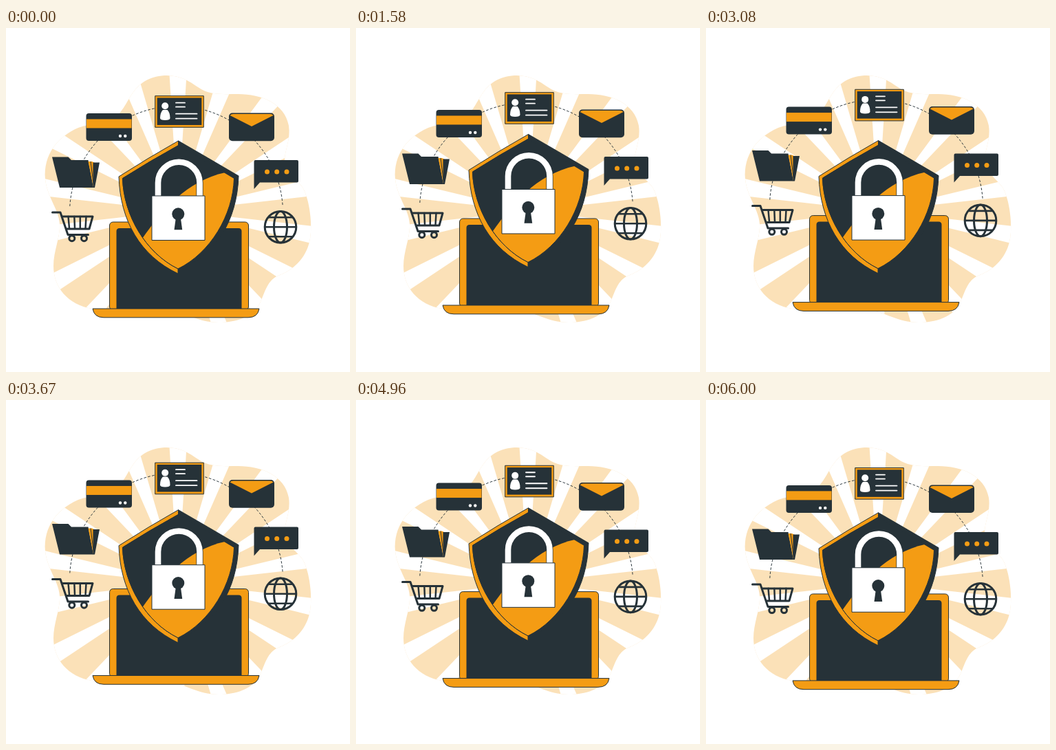
Write an HTML page that moves like this. It is 500x500 px and loops after 6040 ms.

```html
<!DOCTYPE html>
<html lang="en">
<head>
<meta charset="utf-8">
<title>Secure data</title>
<style>
  html, body { margin: 0; width: 100%; height: 100%; overflow: hidden; background: #fff; }
  svg { display: block; width: 100vw; height: 100vh; }
  .o { fill: #f49c14; }
  .d { fill: #263238; }
  .w { fill: #fff; }
  .edge { stroke: #263238; stroke-width: 1; stroke-linejoin: round; }
  .line { fill: none; stroke: #263238; stroke-width: 3; stroke-linecap: round; stroke-linejoin: round; }
</style>
</head>
<body>
<svg viewBox="0 0 500 500">
  <defs>
    <path id="blob" d="M230 69C253 68 266 77 279 86C296 98 315 96 337 96C372 96 405 110 411 142C414 162 405 178 405 192C406 208 421 219 430 230C440 244 446 282 442 306C438 331 421 350 398 359C379 366 377 384 369 400C358 421 333 428 309 428C278 428 260 412 232 409C195 405 155 412 125 408C90 402 69 377 69 346C69 324 79 304 78 285C77 264 60 246 57 220C54 184 75 158 105 145C126 137 148 142 164 125C182 106 184 73 230 69Z"/>
    <clipPath id="blobClip"><use href="#blob"/></clipPath>
    <path id="face" d="M250 171Q209 193.500 169.500 218.500C171 272 203 327 250 350C297 327 330 272 331.500 218.500Q291 193.500 250 171Z"/>
    <clipPath id="faceClip"><use href="#face"/></clipPath>
    <path id="shackle" d="M221 246V225A30.200 30.200 0 0 1 281.500 225V246" fill="none"/>
  </defs>

  <use href="#blob" fill="#fbe1b8"/>
  <path id="rays" class="w" clip-path="url(#blobClip)"/>

  <g id="scene">
    <path d="M92.800 259A155 155 0 0 1 402.200 259" fill="none" stroke="#263238" stroke-dasharray="3.500 2.500"/>

    <!-- laptop -->
    <rect class="o edge" x="150.500" y="282" width="202" height="128" rx="5"/>
    <path class="d" d="M160.500 408V295.500Q160.500 291 165 291H338Q342.500 291 342.500 295.500V408Z"/>
    <path class="o edge" d="M126 408H368Q366 420.800 352 420.800H142Q128 420.800 126 408Z"/>

    <!-- bank card -->
    <rect class="d" x="116.500" y="124" width="66.500" height="40" rx="4"/>
    <rect class="o" x="117" y="132.500" width="65.500" height="13"/>
    <circle class="w" cx="166" cy="157" r="2.200"/>
    <circle class="w" cx="173.300" cy="157" r="2.200"/>

    <!-- identity card -->
    <rect class="o edge" x="216.700" y="98.700" width="70.600" height="45.600"/>
    <rect class="d" x="219.700" y="101.500" width="64.600" height="39.500"/>
    <circle class="w" cx="231.200" cy="113.300" r="5"/>
    <path class="w" d="M228 119H234.500Q238.500 123 238.500 131Q238.500 134 231.200 134Q224 134 224 131Q224 123 228 119Z"/>
    <path d="M247 108.700H260M247 114.700H260M247 124.700H277.500M247 131.700H277.500" fill="none" stroke="#fff" stroke-width="1.800" stroke-linecap="round"/>

    <!-- envelope -->
    <rect class="d" x="324" y="123.500" width="66" height="40.700" rx="5"/>
    <path class="o" d="M325.500 127Q327 125 330 125H384Q387 125 388.500 127L357 143Z"/>

    <!-- speech bubble -->
    <path class="d" d="M362.500 192H423Q425 192 425 194V222.500Q425 224.500 423 224.500H369L360.500 234V194Q360.500 192 362.500 192Z"/>
    <circle class="o" cx="379.500" cy="209" r="3.500"/>
    <circle class="o" cx="393.700" cy="209" r="3.500"/>
    <circle class="o" cx="408" cy="209" r="3.500"/>

    <!-- folder -->
    <path class="d" d="M67 187.500H90.500L95 192H119.500L127 232H78Z"/>
    <path class="o" d="M119.500 194H125L129 196L127 231Z"/>
    <path class="d" d="M126.500 195.500H136L129 232H126.500Z"/>
    <path d="M123 194L127.500 230" stroke="#263238"/>

    <!-- cart -->
    <g class="line">
      <path d="M67.500 268H79L90 300.500H119.500"/>
      <path d="M82 274H126L121 292H88"/>
      <path d="M90.500 274L92 291M99.300 274L100 291M107.800 274V291M116.500 274L115.500 291" stroke-width="2.500"/>
      <circle cx="95.800" cy="305.700" r="4"/>
      <circle cx="113.500" cy="305.700" r="4"/>
    </g>

    <!-- globe -->
    <g class="line">
      <circle cx="399" cy="289.300" r="22.800"/>
      <ellipse cx="399" cy="289.300" rx="9.500" ry="22.800"/>
      <path d="M377 289.300H421M382 275.300H416M382 303.300H416" stroke-width="2.600"/>
    </g>
  </g>

  <g id="shield">
    <path class="d edge" d="M250.500 164Q293 188.500 338 215C336 280 305 331 250 353Z"/>
    <path class="o edge" d="M250.500 164Q207 188.500 164 216C166 280 195 331 250 357Z"/>
    <use href="#face" class="d edge"/>
    <path class="o" clip-path="url(#faceClip)" d="M198 306C226 266 262 222 319 210L332 218.500V360H198Z"/>
    <use href="#face" class="edge" fill="none"/>

    <!-- padlock -->
    <use href="#shackle" stroke="#263238" stroke-width="10"/>
    <use href="#shackle" stroke="#fff" stroke-width="8.600"/>
    <rect class="w edge" x="212" y="244" width="77" height="64.500"/>
    <circle class="d" cx="250.300" cy="270.300" r="9"/>
    <path class="d" d="M247 275L244.500 293.300H256.200L253.700 275Z"/>
  </g>
</svg>
<script>
  const LOOP = 6040;
  const get = id => document.getElementById(id);

  // white sunburst behind everything, one ray every 20 degrees
  const point = deg => {
    const a = deg * Math.PI / 180;
    return `${250 + 400 * Math.sin(a)} ${266 - 400 * Math.cos(a)}`;
  };
  let rays = '';
  for (let deg = 0; deg < 360; deg += 20) {
    rays += `M250 266L${point(deg - 3.6)}L${point(deg + 3.6)}Z`;
  }
  get('rays').setAttribute('d', rays);

  // linear rise and fall over one period
  const float = (id, time, period, lift) => {
    const phase = time % period / period;
    const y = -lift * (1 - Math.abs(1 - 2 * phase));
    get(id).setAttribute('transform', `translate(0 ${y.toFixed(3)})`);
  };

  const start = performance.now();
  function draw() {
    const time = (performance.now() - start) % LOOP;
    float('scene', time, LOOP, 9.6);
    float('shield', time, LOOP / 2, 10);
    requestAnimationFrame(draw);
  }
  draw();
</script>
</body>
</html>
```
